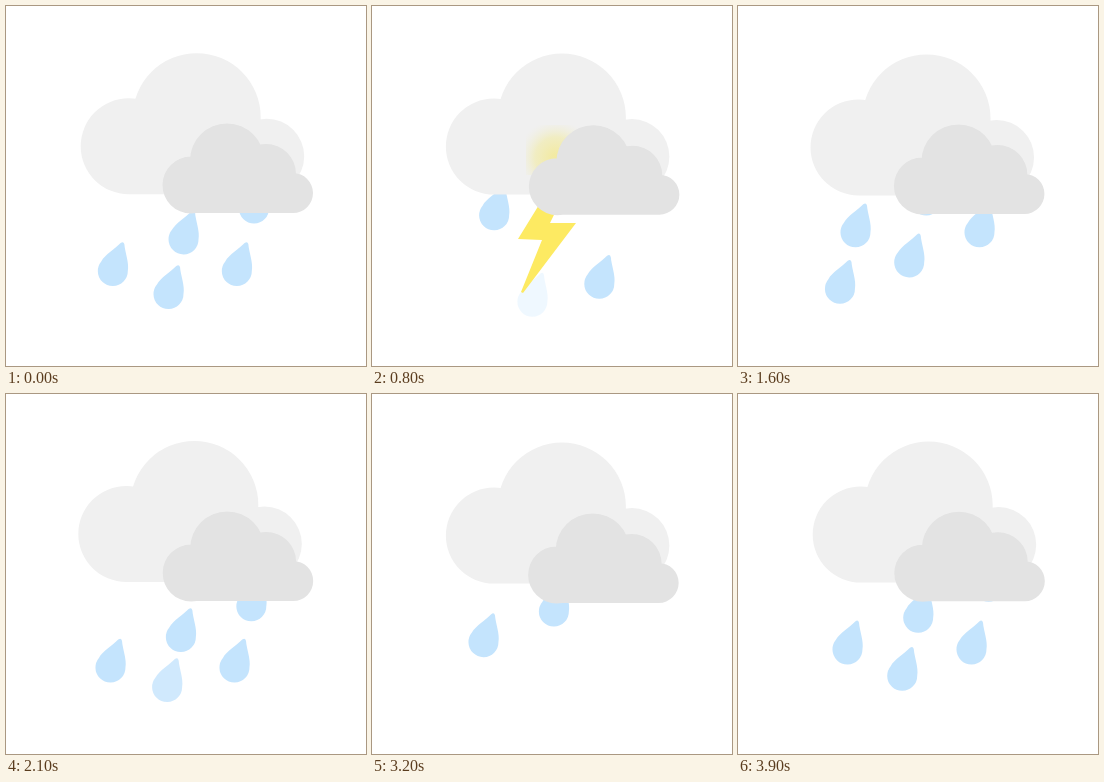
Animation of 360 by 360 pixels, one loop 4000 ms. Source, as an HTML page with a canvas:

```html
<!DOCTYPE html>
<html lang="en">
<head>
<meta charset="utf-8">
<title>Thunderstorm</title>
<style>
  html, body { margin: 0; width: 100%; height: 100%; overflow: hidden; background: #fff; }
  canvas { display: block; width: 360px; height: 360px; }
</style>
</head>
<body>
<canvas id="stage" width="360" height="360"></canvas>
<script>
const ctx = document.getElementById('stage').getContext('2d');
const LOOP = 4000, CYCLE = 2000, STEP = 100, LIFE = 1300;

// Lane: x of a drop as it leaves the cloud; start: moment within a cycle.
const drops = [
  { lane: 128, start: 580 },
  { lane: 190, start: 895 },
  { lane: 128, start: 1205 },
  { lane: 252, start: 1205 },
  { lane: 190, start: 1532 },
  { lane: 252, start: 1850 }
];

const bigCloud = [[122, 140, 48], [190, 111, 64], [260, 150, 37.5]];
const smallCloud = [[185, 179, 28.5], [221, 154.5, 37], [260, 168, 30], [287, 187, 20]];

const clamp = v => Math.max(0, Math.min(1, v));
const wave = (time, period, peak) => Math.cos((time - peak) / period * Math.PI * 2);

// Steady fall that slows down close to the ground.
function fall(age) {
  const braking = Math.max(0, age - 750);
  return 188 + 0.097 * age - 5.7e-5 * braking * braking;
}

function drawDrop({ lane, start }, phase) {
  const age = (phase - start + CYCLE) % CYCLE;
  if (age >= LIFE) return;
  const y = fall(age);
  ctx.save();
  ctx.globalAlpha = clamp((LIFE - age) / 120);
  ctx.translate(lane - 0.275 * (y - 188), y);
  ctx.rotate(0.34);
  ctx.fillStyle = '#c4e4fd';
  ctx.beginPath();
  ctx.arc(0, 0, 15, -0.35, Math.PI + 0.35);
  ctx.bezierCurveTo(-13, -13, -5, -22, -2, -29);
  ctx.quadraticCurveTo(0, -32, 2, -29);
  ctx.bezierCurveTo(5, -22, 13, -13, 14.1, -5.1);
  ctx.fill();
  ctx.restore();
}

function drawCloud(puffs, bottom, color, dx, dy) {
  const [left] = puffs[0], [right] = puffs[puffs.length - 1];
  ctx.save();
  ctx.translate(dx, dy);
  ctx.fillStyle = color;
  ctx.beginPath();
  for (const [x, y, r] of puffs) {
    ctx.moveTo(x + r, y);
    ctx.arc(x, y, r, 0, Math.PI * 2);
  }
  const top = puffs[0][1];
  ctx.rect(left, top, right - left, bottom - top);
  ctx.fill();
  ctx.restore();
}

function drawLightning(phase) {
  const strength = clamp((phase - 720) / 60) * clamp((1150 - phase) / 150);
  if (!strength) return;
  ctx.save();
  ctx.globalAlpha = strength;

  const glow = ctx.createRadialGradient(184, 152, 4, 184, 152, 38);
  glow.addColorStop(0, 'rgba(243,233,150,0.85)');
  glow.addColorStop(0.5, 'rgba(241,235,170,0.65)');
  glow.addColorStop(1, 'rgba(240,238,215,0)');
  ctx.fillStyle = glow;
  ctx.fillRect(154, 119, 52, 50);

  ctx.fillStyle = '#fdea62';
  ctx.beginPath();
  [[186, 168], [146, 233], [170, 234], [149, 286], [151, 287], [204, 217], [178, 217], [198, 176]]
    .forEach(([x, y]) => ctx.lineTo(x, y));
  ctx.fill();
  ctx.restore();
}

function draw(time) {
  const phase = time % CYCLE;
  ctx.fillStyle = '#fff';
  ctx.fillRect(0, 0, 360, 360);
  drops.forEach(drop => drawDrop(drop, phase));
  drawCloud(bigCloud, 188, '#f0f0f0', -0.5 + 1.2 * wave(time, LOOP, 0), 0.7 + wave(time, CYCLE, 1350));
  drawLightning(phase);
  drawCloud(smallCloud, 207, '#e3e3e3', 0.6 * wave(time, CYCLE, 500), 1 + wave(time, CYCLE, 1080));
}

function tick(now) {
  draw(Math.floor(now % LOOP / STEP) * STEP);
  requestAnimationFrame(tick);
}

draw(0);
requestAnimationFrame(tick);
</script>
</body>
</html>
```
